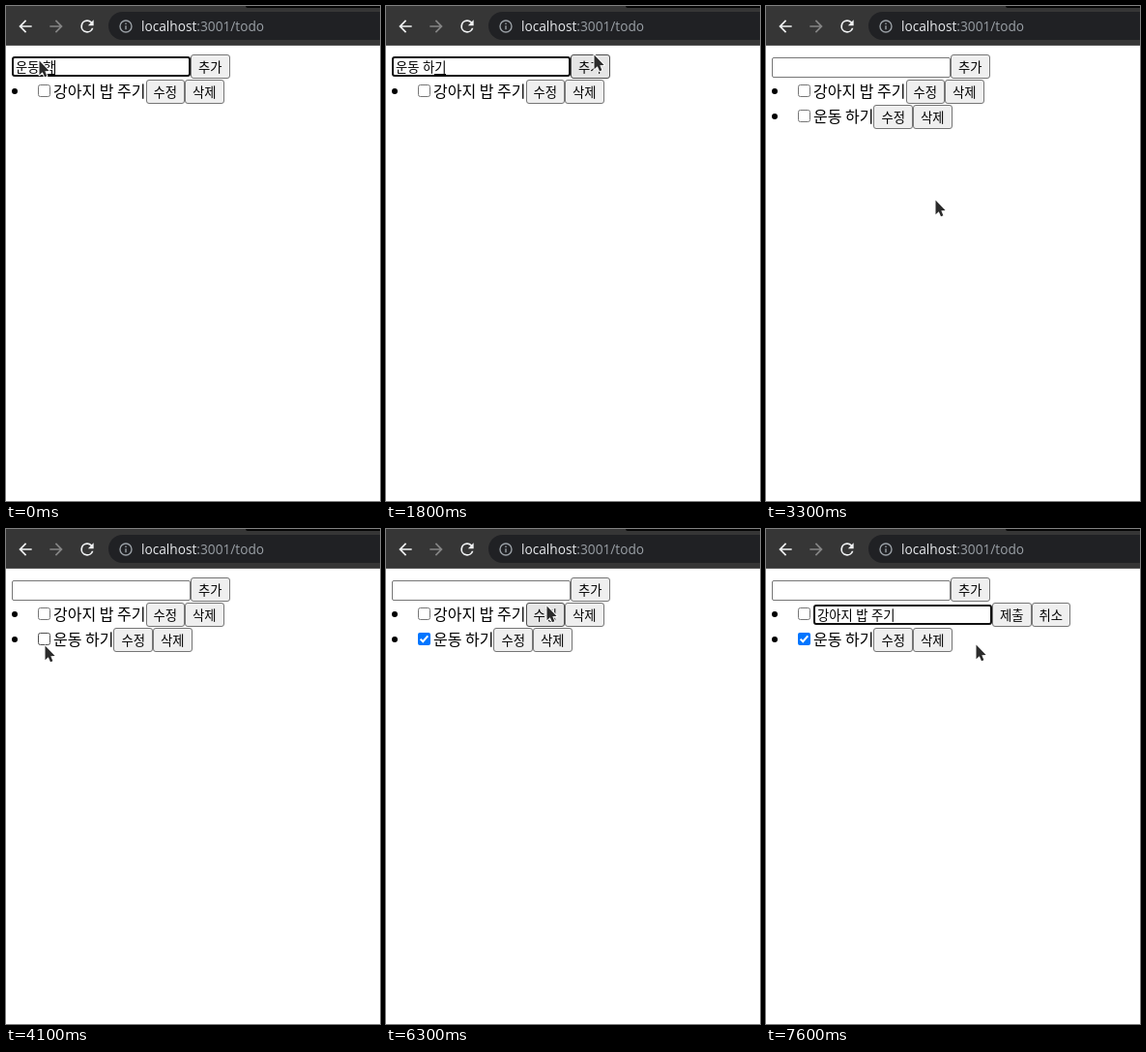
Recreate the animation shown at these times as an HTML page with a canvas. Size 387 by 511 pixels, loop 8 s.

```html
<!DOCTYPE html>
<html lang="ko">
<head>
<meta charset="utf-8">
<title>todo</title>
<style>
html, body { margin: 0; width: 100%; height: 100%; overflow: hidden; background: #fff; }
canvas { display: block; width: 387px; height: 511px; }
</style>
</head>
<body>
<canvas id="stage"></canvas>
<script>
const W = 387, H = 511, LOOP = 8000, STEP = 100;
const KO = '"Noto Sans CJK KR", "Noto Sans CJK JP", sans-serif';
const SMALL = `13.333px "Noto Sans", ${KO}`, BODY = `16px ${KO}`;
const URL_FONT = '13.7px "Open Sans", "Noto Sans", sans-serif';
const LIGHT = '#f1f3f4', GREY = '#9aa0a6';

const BACK = new Path2D('M20 11H7.83l5.59-5.59L12 4l-8 8 8 8 1.41-1.41L7.83 13H20z');
const RELOAD = new Path2D('M17.65 6.35C16.2 4.9 14.2 4 12 4a8 8 0 1 0 7.73 10h-2.08A6 6 0 1 1 12 6c1.66 0 3.14.69 4.22 1.78L13 11h7V4z');

const canvas = document.getElementById('stage');
const c = canvas.getContext('2d');
const dpr = window.devicePixelRatio || 1;
canvas.width = W * dpr;
canvas.height = H * dpr;

// Pointer strokes: arrival time, duration, x, y.
const strokes = [
  [200, 100, 31, 50], [1600, 400, 297, 16], [1800, 200, 215, 50], [2100, 200, 214, 57],
  [2900, 300, 228, 95], [3100, 100, 242, 130], [3300, 200, 175, 200], [3400, 100, 97, 187],
  [3700, 200, 47, 113], [4100, 300, 40, 120], [5100, 400, 146, 164], [5500, 300, 219, 147],
  [6100, 200, 166, 82], [6300, 100, 166, 79], [6800, 100, 295, 104], [6900, 100, 131, 104],
  [7300, 300, 217, 119]
];

let tip;
const smooth = k => k * k * (3 - 2 * k);
const over = (x, y, w, h) => tip.x >= x && tip.x < x + w && tip.y >= y && tip.y < y + h;
const blink = (t, since) => Math.floor((t - since) / 500) % 2 === 0;

function pointerAt(t) {
  let x = 34, y = 56;
  for (const [end, span, toX, toY] of strokes) {
    const k = smooth(Math.min(1, Math.max(0, 1 + (t - end) / span)));
    x += (toX - x) * k;
    y += (toY - y) * k;
  }
  return { x: Math.round(x), y: Math.round(y) };
}

function fill(x, y, w, h, color, r = 0) {
  c.fillStyle = color;
  c.beginPath();
  c.roundRect(x, y, w, h, r);
  c.fill();
}

function frame(x, y, w, h, color, line, r) {
  c.strokeStyle = color;
  c.lineWidth = line;
  c.beginPath();
  c.roundRect(x + line / 2, y + line / 2, w - line, h - line, r);
  c.stroke();
}

function disc(x, y, r) {
  c.beginPath();
  c.arc(x, y, r, 0, Math.PI * 2);
}

// Widths round up to the 1/64 px grid of browser layout.
function widthOf(s, font) {
  c.font = font;
  return Math.ceil(c.measureText(s).width * 64) / 64;
}

function text(s, x, y, font, color = '#000') {
  c.font = font;
  c.fillStyle = color;
  c.fillText(s, x, y);
  return widthOf(s, font);
}

function lines(points, close) {
  c.beginPath();
  points.forEach(([x, y]) => c.lineTo(x, y));
  if (close) c.closePath();
}

function icon(path, x, color, dir = 1) {
  c.save();
  c.translate(x, 21);
  c.scale(dir * 20 / 24, 20 / 24);
  c.translate(-12, -12);
  c.fillStyle = color;
  c.fill(path);
  c.restore();
}

function browserBar() {
  fill(0, 0, W, 40, '#363636');
  fill(0, 40, W, 1, '#505050');
  fill(248, 0, W - 248, 2, '#050505', [0, 0, 0, 2]);
  fill(106, 6, W, 29, '#202124', 14.5);
  icon(BACK, 20, LIGHT);
  icon(BACK, 52, '#858585', -1);
  icon(RELOAD, 84, LIGHT);

  c.strokeStyle = GREY;
  c.lineWidth = 1.4;
  disc(124, 21, 6);
  c.stroke();
  fill(123.3, 17.6, 1.4, 1.4, GREY);
  fill(123.3, 20.3, 1.4, 4, GREY);

  const w = text('localhost', 140, 26, URL_FONT, '#e8eaed');
  text(':3001/todo', 140 + w, 26, URL_FONT, GREY);
}

function button(label, x, y) {
  const w = widthOf(label, SMALL) + 16;
  const hot = over(x, y, w, 25);
  const left = Math.round(x), bw = Math.round(x + w) - left;
  fill(left, y, bw, 25, hot ? '#e5e5e5' : '#efefef', 3);
  frame(left, y, bw, 25, hot ? '#4f4f4f' : '#767676', 1, 2.5);
  text(label, x + 8, y + 18, SMALL);
  return x + w;
}

function field(value, x, y, focus, caret, composing) {
  if (focus) frame(x, y, 185, 21, '#101010', 2, 2);
  else frame(x, y + 1, 185, 21, '#767676', 1, 1.5);
  const end = x + 4 + text(value, x + 4, y + 16, SMALL);
  if (composing) {
    const w = widthOf(value.slice(-1), SMALL);
    fill(Math.round(end - w), y + 18, Math.round(w), 2, '#000');
  }
  if (caret) fill(Math.floor(end), y + 4, 1, 15, '#000');
}

function checkbox(x, y, on, hot) {
  if (!on) {
    frame(x, y, 13, 13, hot ? '#4f4f4f' : '#767676', 1, 2);
    return;
  }
  fill(x, y, 13, 13, hot ? '#005cc8' : '#0075ff', 2);
  c.strokeStyle = '#fff';
  c.lineWidth = 2;
  lines([[x + 2.6, y + 6.6], [x + 5.2, y + 9.2], [x + 10.3, y + 3.3]]);
  c.stroke();
}

function item(label, y, on, edit, caret) {
  c.fillStyle = '#000';
  disc(9, y + 12, 3);
  c.fill();
  checkbox(33, y + 5, on, over(33, y + 12, 78, 12));
  let x = 49;
  if (edit) {
    field(label, x, y + 2, true, caret);
    x += 185;
  } else {
    x += text(label, x, y + 18, BODY);
  }
  x = button(edit ? '제출' : '수정', x, y);
  button(edit ? '취소' : '삭제', x, y);
}

function pointer() {
  c.save();
  c.translate(tip.x, tip.y);
  lines([[0.5, 0.5], [0.5, 15.2], [3.8, 12.2], [6, 17.2], [8.4, 16.2], [6.3, 11.2], [10.6, 11]], true);
  c.lineJoin = 'round';
  c.strokeStyle = '#fff';
  c.lineWidth = 2;
  c.stroke();
  c.fillStyle = '#2b2b2b';
  c.fill();
  c.restore();
}

function draw(t) {
  tip = pointerAt(Math.floor(t / STEP) * STEP);
  c.setTransform(dpr, 0, 0, dpr, 0, 0);
  fill(0, 0, W, H, '#fff');
  browserBar();

  const typing = t < 2200;
  const typedAt = t < 200 ? 0 : 200;
  const value = t >= 2300 ? '' : typedAt ? '운동 하기' : '운동 학';
  field(value, 6, 52, typing, typing && blink(t, typedAt), typing);
  button('추가', 191, 50);

  item('강아지 밥 주기', 76, false, t >= 6600, blink(t, 7100));
  if (t >= 2400) item('운동 하기', 102, t >= 4400);
  pointer();
}

const start = performance.now();
function tick() {
  draw((performance.now() - start) % LOOP);
  requestAnimationFrame(tick);
}
tick();
</script>
</body>
</html>
```
